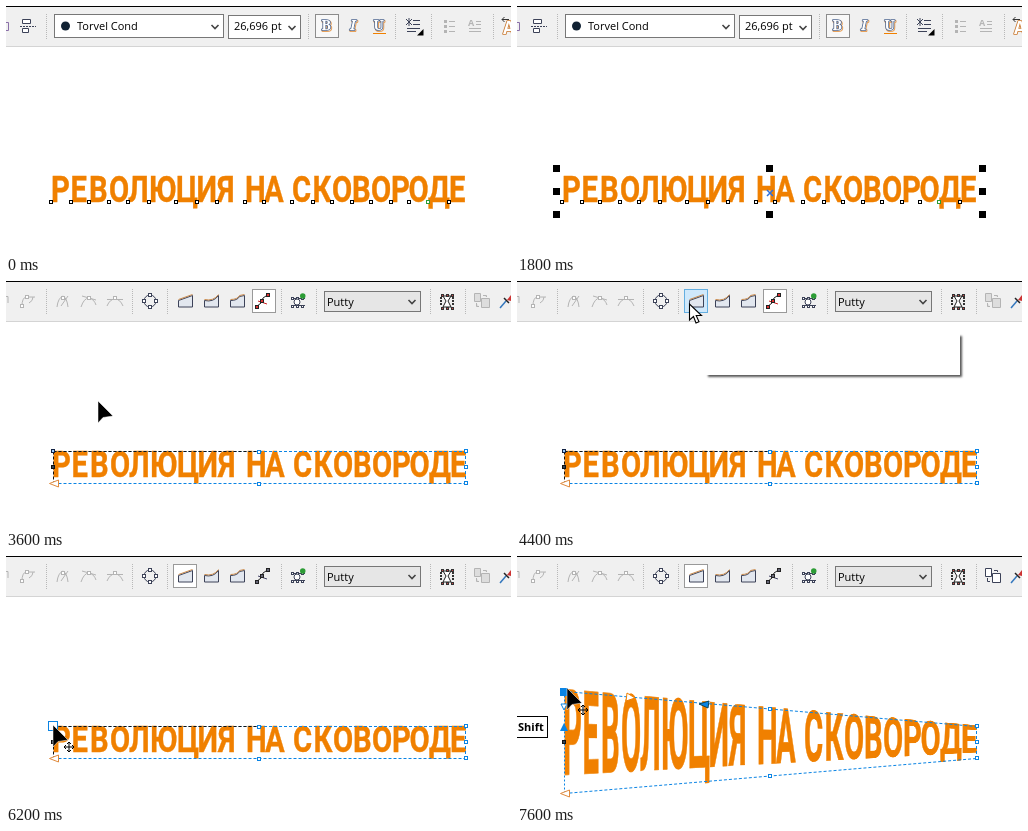
An HTML page with a canvas that plays this animation: 505 by 247 pixels, repeating every 8 s.

```html
<!DOCTYPE html>
<html lang="ru">
<head>
<meta charset="utf-8">
<title>Envelope tool</title>
<style>
html, body { margin: 0; width: 100%; height: 100%; overflow: hidden; background: #fff; }
canvas { display: block; }
</style>
</head>
<body>
<canvas id="stage" width="505" height="247"></canvas>
<script>
const LOOP = 8000, STEP = 200;
const ORANGE = '#f08000', BLUE = '#0a84e4', INK = '#3c4258', DIM = '#b4b4b4';
const UI = '"Open Sans", "Noto Sans", sans-serif';
const LETTERS = [...'РЕВОЛЮЦИЯНАСКОВОРОДЕ'];
const LETTER_X = [45, 64.5, 83, 103, 122, 143, 170, 190.5, 211, 239, 258,
  286, 306.5, 326, 346, 365, 385, 402.5, 422, 443];
const LEFT = 47, RIGHT = 460, TOP = 170, BOTTOM = 202, MID = 253;

const c = document.getElementById('stage').getContext('2d');

function box(x, y, w, h, fill, edge) {
  c.fillStyle = fill;
  c.fillRect(x, y, w, h);
  if (edge) {
    c.strokeStyle = edge;
    c.lineWidth = 1;
    c.strokeRect(x + .5, y + .5, w - 1, h - 1);
  }
}
const node = (x, y, edge, fill = '#fff', size = 4) =>
  box(Math.round(x - size / 2), Math.round(y - size / 2), size, size, fill, edge);

function path(d, fill, stroke, width = 1, x = 0, y = 0) {
  const p = new Path2D(d);
  c.save();
  c.translate(x, y);
  if (fill) { c.fillStyle = fill; c.fill(p); }
  if (stroke) { c.strokeStyle = stroke; c.lineWidth = width; c.stroke(p); }
  c.restore();
}
function line(x1, y1, x2, y2, color, dash = []) {
  c.setLineDash(dash);
  path(`M${x1} ${y1}L${x2} ${y2}`, null, color);
  c.setLineDash([]);
}
function label(text, x, y, font = `11px ${UI}`, color = '#000') {
  c.font = font;
  c.fillStyle = color;
  c.fillText(text, x, y);
}
function outlined(ch, x, y, font, color, width) {
  c.font = font;
  c.lineJoin = 'round';
  c.lineWidth = width;
  c.strokeStyle = color;
  c.strokeText(ch, x, y);
  c.fillStyle = '#fff';
  c.fillText(ch, x, y);
  c.lineJoin = 'miter';
}

// ---- headline ----
function headline(g, shift) {
  g.font = '700 37.5px Roboto, sans-serif';
  g.fillStyle = g.strokeStyle = ORANGE;
  g.lineWidth = .4;
  LETTERS.forEach((ch, i) => {
    g.save();
    g.translate(LETTER_X[i] + shift, 196.3);
    g.scale(.78, 1);
    g.fillText(ch, 0, 0);
    g.strokeText(ch, 0, 0);
    g.restore();
  });
}
const SHARP = 4, BAND = 36, BAND_TOP = TOP - 2;
const strip = document.createElement('canvas');
strip.width = 505;
strip.height = BAND * SHARP;
const s = strip.getContext('2d');
s.scale(1, SHARP);
s.translate(0, -BAND_TOP);
headline(s, 1);

function warpedHeadline(lift) {
  for (let x = 40; x < 470; x++) {
    const d = lift * Math.min(1, (RIGHT - x) / (RIGHT - LEFT));
    const k = (BOTTOM - TOP + 2 * d) / (BOTTOM - TOP);
    c.drawImage(strip, x, 0, 1, BAND * SHARP, x, TOP - d + (BAND_TOP - TOP) * k, 1, BAND * k);
  }
}

// ---- toolbars ----
function separators(xs) {
  for (const x of xs)
    for (let y = 8; y < 33; y += 2) box(x, y, 1, 1, '#b8b8b8');
}
const chevron = (x, y) => path('M-3.5 -2L0 1.5L3.5 -2', null, '#444', 1.6, x, y);

function textBar() {
  separators([40, 302, 389, 425, 487]);
  path('M0 16.5H2.5V24.5H0', null, '#8a6fa8');
  path('M16.5 13.5H24.5V17.5H16.5ZM16.5 22.5H22.5V26.5H16.5Z', '#fff', INK);
  c.setLineDash([2, 1]);
  path('M14 20.5H30', null, INK);
  c.setLineDash([]);
  box(48, 8, 170, 24, '#fff', '#777');
  path('M64 20A4.5 4.5 0 1 1 55 20A4.5 4.5 0 1 1 64 20', '#123');
  label('Torvel Cond', 71, 24);
  chevron(209, 21);
  box(222, 9, 73, 24, '#fff', '#777');
  label('26,696 pt', 228, 24);
  chevron(286, 22);
  box(309, 8, 24, 24, '#f8f8f8', '#8c8c8c');
  for (const [ch, x, slant] of [['B', 315.5, ''], ['I', 344, 'italic '], ['U', 367.5, '']]) {
    const font = `${slant}bold 14px "Noto Serif", serif`;
    outlined(ch, x + .7, 24.7, font, '#e8a15a', 2.2);
    outlined(ch, x, 24, font, '#4d6690', 1.6);
  }
  path('M367 27.5H380', null, ORANGE);
  path('M407 14.5H414M407 18.5H414M401 22.5H414M401 25.5H410', null, INK);
  path('M400 13L406 19M406 13L400 19M403 12V20', null, INK);
  path('M411 29.5H417.5V23Z', '#000');
  path('M443 15.5H449M443 20.5H449M443 25.5H449', null, DIM);
  for (const y of [14, 19, 24]) box(438, y, 3, 3, DIM);
  path('M470 15.5H475M470 18.5H475M463 22.5H475M463 25.5H475', null, DIM);
  label('A', 462, 20, `bold 9px ${UI}`, DIM);
  path('M503 13.5H496L498.5 11M496 13.5L498.5 16', null, '#333');
  outlined('A', 497, 28, `bold 17px ${UI}`, '#c9762a', 1.6);
}

function modeIcon(kind, x) {
  const tops = ['L7 -6', 'Q2 1 7 -6', 'Q0 -1 2 -5L7 -6'];
  path(`M-7 -1${tops[kind]}V5.5H-7Z`, '#e2e7ef', INK, 1, x + .5, 20.5);
  path(`M-7 -1${tops[kind]}`, null, '#c98a4c', 1, x + .5, 19.5);
}

function envelopeBar(t) {
  separators([40, 126, 161, 275, 310, 424, 459]);
  path('M0 15.5H2V22', null, DIM);
  path('M16 25Q16 17 20 16H29M23 22Q27 20 27 16', null, DIM);
  for (const [x, y] of [[16, 25], [21, 16]]) node(x, y, DIM);
  path('M51 26Q52 17 57 15Q61 17 62 26M55 25L62 15', null, DIM);
  path('M75 26Q78 17 83 17Q88 18 90 24M76 15L90 19', null, DIM);
  path('M101 25Q104 18 109 18Q114 18 117 25M101 18.5H117', null, DIM);
  for (const x of [57, 83, 109]) node(x, 17, DIM);
  path('M150 20A6 6 0 1 1 138 20A6 6 0 1 1 150 20', null, INK);
  for (const [x, y] of [[144, 14], [150, 20], [144, 26], [138, 20]]) node(x, y, INK);

  const chosen = t < 4600 ? 246 : 167;
  box(chosen, 8, 24, 24, '#fff', '#999');
  if (t >= 4000 && t < 5200) box(167, 8, 24, 24, '#cfe8fb', '#64aee0');
  for (let i = 0; i < 3; i++) modeIcon(i, 179 + 26 * i);
  path('M250 26L255 22L257 17L263 13', null, '#222');
  path('M252 20L261 23', null, t < 4600 ? '#c22' : '#446');
  for (const [x, y] of [[251, 26], [256, 20], [262, 14]]) node(x, y, '#222', t < 4600 ? '#d33' : '#667');

  path('M285 17.5H299M285 24.5H299', null, INK);
  for (const x of [286, 291, 296]) for (const y of [17, 25]) node(x, y, INK, '#fff', 3);
  path('M294 21A3 3 0 1 1 288 21A3 3 0 1 1 294 21', '#fff', INK);
  path('M299.5 15A2.7 2.7 0 1 1 294 15A2.7 2.7 0 1 1 299.5 15', '#2c9c35');
  box(318, 10, 97, 21, '#e6e6e6', '#777');
  label('Putty', 321, 25);
  chevron(406, 21);
  path('M437 15H445L442 20L445 26H437L440 20Z', '#fff', '#222');
  for (const x of [436, 441, 446]) for (const y of [14, 27]) node(x, y, '#333', '#c44', 3);
  for (const x of [435, 447]) for (const y of [17, 20, 23]) node(x, y, '#333', '#333', 2);
  const copy = t >= 7600 ? INK : DIM, paper = t >= 7600 ? '#fff' : '#ddd';
  path('M468.5 12.5H474.5V20.5H468.5Z', paper, copy);
  path('M475.5 17.5H483.5V26.5H475.5ZM470.5 22V25.5H473M477 14.5H480.5V16', paper, copy);
  path('M494 27L500 20', null, '#3477bd', 1.5);
  path('M498 17L503 22', null, '#222', 1.5);
  path('M501 19L505 14V20Z', '#c33');
}

// ---- editing marks ----
function selection() {
  for (const x of [39.5, 252.5, 465.5])
    for (const y of [162.5, 185.5, 208.5])
      if (x !== 252.5 || y !== 185.5) box(x - 3.5, y - 3.5, 7, 7, '#000');
  path('M250 184L256 190M256 184L250 190', null, '#2a6fe0', 1.5);
}

function envelope(t, lift) {
  const y0 = TOP - lift + .5, y1 = BOTTOM + lift + .5, x0 = LEFT + .5, x1 = RIGHT - .5;
  const m0 = TOP - lift / 2 + .5, m1 = BOTTOM + lift / 2 + .5, dash = [3, 2];
  const dragging = lift > 0 && t < 7600;
  line(MID, m0, x1, TOP + .5, BLUE, dash);
  line(x1, TOP, x1, BOTTOM, BLUE, dash);
  line(x0, y1, x1, BOTTOM + .5, BLUE, dash);
  line(x0, y0, MID, m0, BLUE, dragging ? [] : dash);
  if (!lift) line(x0, y0, MID, m0, '#111', dash);
  line(x0, y0, x0, y1, lift ? BLUE : '#111', lift ? [2, 2] : dash);
  for (const [x, y] of [[MID, m0], [RIGHT, TOP], [RIGHT, 186], [RIGHT, BOTTOM], [MID, m1]]) node(x, y, BLUE);
  node(LEFT, 186, '#111', '#345');
  if (dragging) node(MID + 1, 172, '#111', '#111', 3);
  path('M-5 0L4 -3.5V3.5Z', '#fff', '#e08a3c', 1, 48.5, y1);
  if (lift) box(43, Math.round(y0 - 4), 8, 8, BLUE);
  else if (t >= 6000) node(LEFT, TOP, BLUE, '#fff', 10);
  else node(LEFT, TOP, '#124', '#9cf');
  if (t >= 7600) {
    path('M-3 -4L5 1L-4 4Z', '#fff', ORANGE, 1, 113, 141);
    path('M5 -3L-5 0L4 4Z', BLUE, '#145', 1, 187, 148);
    path('M-3 -3H3L0 3Z', '#fff', BLUE, 1, 47, 151);
    path('M-4 4H4L0 -4Z', BLUE, null, 1, 47, 171);
  }
}

// ---- pointer: time, x, y ----
const ROUTES = [
  [[200, 150, 232], [600, 118, 195], [1000, 89, 162], [1800, 89, 162]],
  [[3200, 4, 225], [3600, 92, 120], [4000, 172, 23], [5000, 172, 23], [5400, 118, 92],
    [5800, 49, 177], [6000, 47, 169], [6400, 47, 169], [7000, 50, 132], [8000, 50, 132]]
];
function pointerAt(t) {
  for (const route of ROUTES)
    for (let i = 1; i < route.length; i++) {
      const [ta, xa, ya] = route[i - 1], [tb, xb, yb] = route[i];
      if (t >= ta && t < tb) {
        const k = (t - ta) / (tb - ta);
        return [Math.round(xa + (xb - xa) * k), Math.round(ya + (yb - ya) * k)];
      }
    }
}
function pointer(t) {
  const at = pointerAt(t);
  if (!at) return;
  const [x, y] = at;
  if (y < 40) path('M0 0V16L4 12.5L6.5 19L9.5 17.8L6.7 11.5H12Z', '#fff', '#000', 1.1, x + .5, y);
  else path('M0 0V22L5 16.5L15 15Z', '#000', '#fff', .5, x, y);
  if ((t >= 1000 && t < 1800) || t >= 6000) {
    path('M-5 0H5M0 -5V5M-3 -2L-5 0L-3 2M3 -2L5 0L3 2M-2 -3L0 -5L2 -3M-2 3L0 5L2 3',
      null, '#000', 1, x + 16, y + 22);
  }
  const pressed = (t >= 1200 && t < 1600) || (t >= 4600 && t < 5000) || (t >= 6400 && t < 7600);
  if (pressed) {
    box(x - 19, y - 19, 16, 16, '#fff', '#333');
    path('M-4 -1V-2Q-4 -5 0 -5Q4 -5 4 -2V2Q4 5 0 5Q-4 5 -4 2V-1H4M0 -5V-1', '#fff', '#000', 1.2, x - 11, y - 11);
    path('M-4 -1V-2Q-4 -5 0 -5V-1Z', '#000', null, 1, x - 11, y - 11);
  }
}

function tooltipShadow() {
  c.save();
  c.shadowColor = 'rgba(0,0,0,.65)';
  c.shadowBlur = 2;
  c.shadowOffsetX = c.shadowOffsetY = 2;
  box(189, 53, 254, 41, '#fff');
  c.restore();
  box(186, 48, 257, 46, '#fff');
}

function draw(t) {
  box(0, 0, 505, 247, '#fff');
  box(0, 0, 505, 40, '#f0f0f0');
  box(0, 0, 505, 1, '#000');
  box(0, 40, 505, 1, '#d4d4d4');

  if (t < 2800) textBar();
  else envelopeBar(t);

  const lift = 35 * Math.min(1, Math.max(0, (t - 6400) / 600));
  if (t >= 7600) warpedHeadline(lift);
  else headline(c, t < 2800 ? 0 : 1);

  if (t < 2800) {
    LETTER_X.forEach((x, i) => node(x, 196, i === 18 ? '#2c9c35' : '#000'));
    if (t >= 1200) selection();
  } else envelope(t, lift);

  if (t >= 4400 && t < 4600) tooltipShadow();
  if (t >= 6400) {
    box(-1, 160, 32, 22, '#fff', '#000');
    label('Shift', 1, 175, `bold 11px ${UI}`);
  }
  pointer(t);
}

function tick() {
  const t = performance.now() % LOOP;
  draw(Math.floor(t / STEP) * STEP);
  requestAnimationFrame(tick);
}
tick();
</script>
</body>
</html>
```
